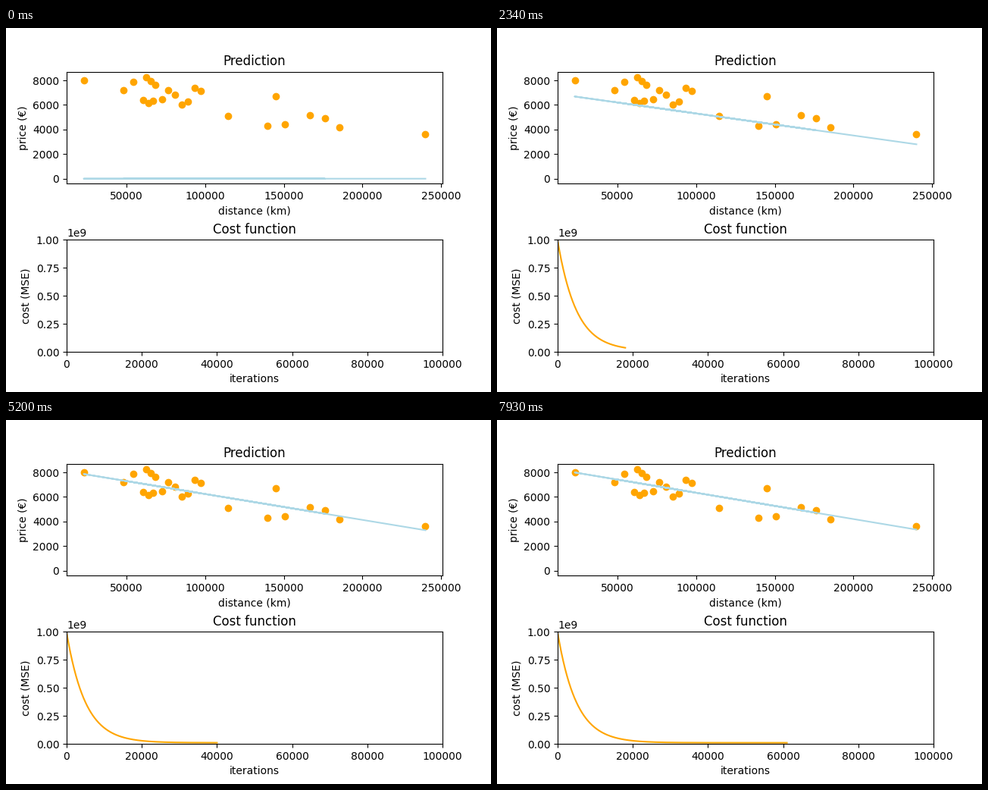
A matplotlib script that plays this animation: 640x480 px, repeating every 8 s.

```python
import matplotlib.pyplot as plt
import numpy as np
from matplotlib.animation import FuncAnimation

FRAMES = 62
LOOP_MS = 8000
STEPS = 1000        # training iterations per frame
RATE = 1e-4         # learning rate on standardised distances

INTERCEPT, SLOPE = 8500, -0.02145
COST_START, COST_END = 9.93e8, 1.07e7


def line(x):
    return INTERCEPT + SLOPE * x


def make_cars(count=24):
    """Cars spread along the distance axis, scattered around the best line."""
    i = np.arange(count)
    km = 1000 * np.interp(i, [0, 1, 3, 8, 15, 16, 17, 19, 20, 22, 23],
                          [22.9, 48.2, 60.9, 68.5, 97.5, 114.8, 139.8,
                           150.5, 166.8, 185.5, 240])
    phase = np.pi * np.interp(i, [0, 10, 17, 23], [0, 10, 13.2, 18])
    spread = np.interp(i, [0, 4, 10, 17, 23], [0, 1100, 350, 1500, 250])
    price = line(km) + spread * np.cos(phase)
    order = np.argsort(price)
    return km[order], price[order]


def predict(x, n):
    """Prediction after n steps of gradient descent from zero."""
    return line(x) * (1 - (1 - RATE) ** n)


def cost(n):
    return COST_END + (COST_START - COST_END) * (1 - RATE) ** (2 * n)


def label(ax, title, xlabel, ylabel):
    ax.set_title(title)
    ax.set_xlabel(xlabel)
    ax.set_ylabel(ylabel)


plt.rcParams["font.family"] = "DejaVu Sans"
fig, (top, bottom) = plt.subplots(2, 1, figsize=(6.4, 4.8), dpi=100)
fig.subplots_adjust(hspace=0.5)

km, price = make_cars()
label(top, "Prediction", "distance (km)", "price (€)")
top.scatter(km, price, color="orange")
fit, = top.plot(km, predict(km, 1), color="lightblue")
top.set_xlim(top.get_xlim())
top.set_ylim(-414.5, 8704.5)

label(bottom, "Cost function", "iterations", "cost (MSE)")
curve, = bottom.plot([], [], color="orange")
bottom.set_xlim(0, 1e5)
bottom.set_ylim(0, 1e9)
bottom.set_yticks(np.linspace(0, 1e9, 5))


def update(i):
    n = i * STEPS
    fit.set_ydata(predict(km, n + 1))
    its = np.arange(0, n + 1, 100)
    curve.set_data(its, cost(its))
    return fit, curve


anim = FuncAnimation(fig, update, frames=FRAMES, interval=LOOP_MS / FRAMES,
                     repeat=True, repeat_delay=0)
plt.show()
```
